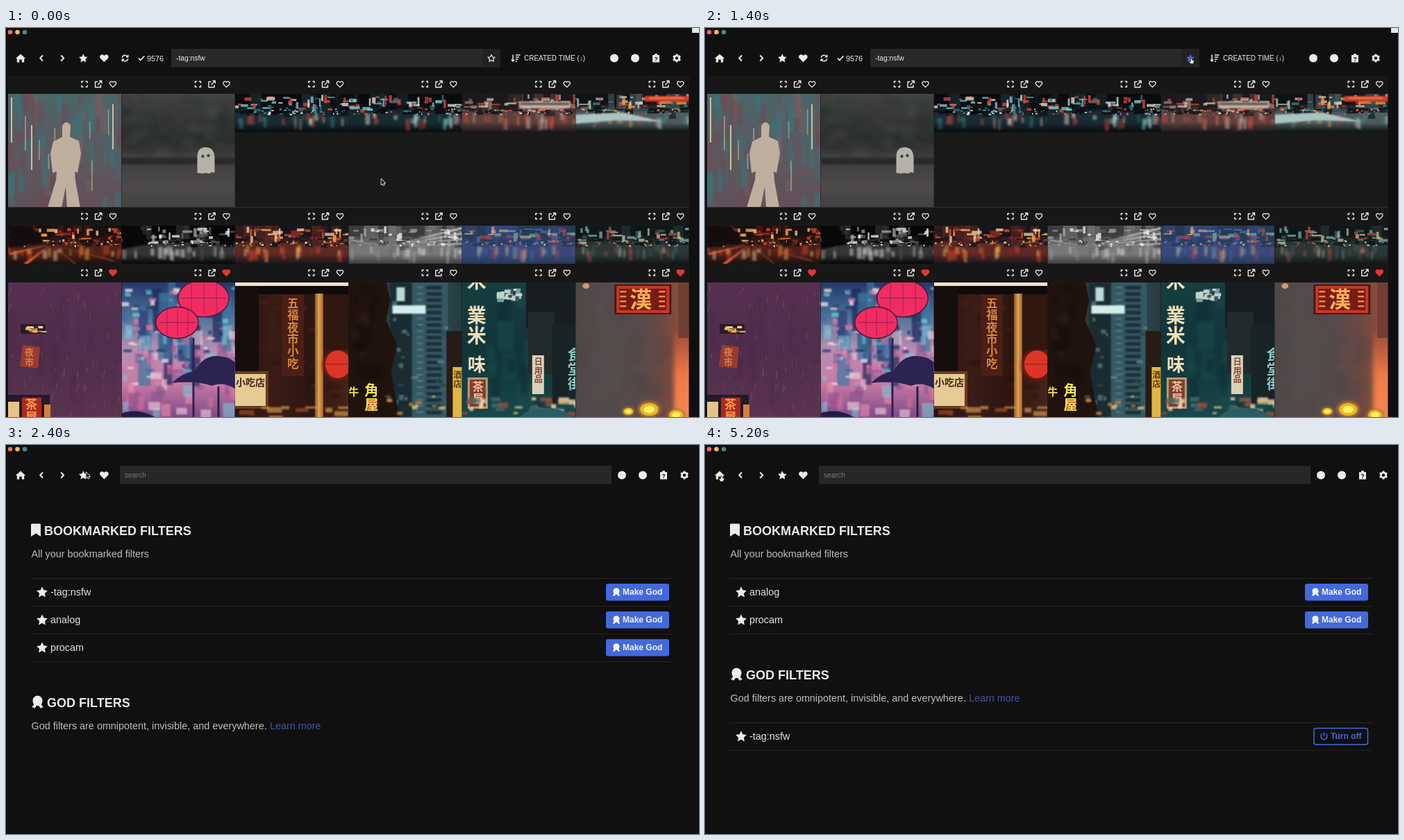
Animation, 998 px wide and 561 px high, one loop 5.3 s. Source, as an HTML page with a canvas:

```html
<!DOCTYPE html>
<html lang="en">
<head>
<meta charset="utf-8">
<title>Bookmarked filters</title>
<style>
html, body { margin: 0; width: 100%; height: 100%; overflow: hidden; background: #101010 }
canvas { display: block }
</style>
</head>
<body>
<canvas id="stage" width="998" height="561"></canvas>
<script>
const LOOP = 5300, STEP = 100, COL = 163.45, LEFT = 3;
const SANS = '"Liberation Sans", Arial, sans-serif';
const CJK = '"Noto Sans CJK JP", "Noto Sans CJK SC", "Noto Sans CJK", sans-serif';
const WHITE = '#ebebeb', BLUE = '#4469dc';

// name: [path around 0,0; stroke width, or 0 for a filled shape]
const ICONS = {
  home: ['M-7.2.4L0-6 7.2.4H5.2V6H1.8V2H-1.8V6H-5.2V.4Z', 0],
  left: ['M2-4L-2 0 2 4', 1.9],
  right: ['M-2-4L2 0-2 4', 1.9],
  star: ['M0-6.2L1.9-2.2 6.3-1.6 3.1 1.5 3.9 5.9 0 3.8-3.9 5.9-3.1 1.5-6.3-1.6-1.9-2.2Z', 0],
  heart: ['M0 5.8L-5.3.6C-8.5-3.4-3-7.6 0-3.6 3-7.6 8.5-3.4 5.3.6Z', 0],
  refresh: ['M-4.5-.8A4.6 4.6 0 0 1 4-2.2M4.6-5V-1.8H1.4M4.5.8A4.6 4.6 0 0 1-4 2.2M-4.6 5V1.8H-1.4', 1.5],
  check: ['M-4 .2L-1.3 3 4.3-3', 1.8],
  sort: ['M-4-5V4M-6.2 2L-4 4.5-1.8 2M0-4.5H6.5M0-1.5H5M0 1.5H3.5M0 4.5H2', 1.5],
  gear: ['M-3.6 0A3.6 3.6 0 1 0 3.6 0A3.6 3.6 0 1 0-3.6 0M0-6V-4M0 4V6M5.2-3L3.5-2M-5.2-3L-3.5-2M5.2 3L3.5 2M-5.2 3L-3.5 2', 2.8],
  clip: ['M-5-4.6H-2V-6.2H2V-4.6H5V6H-5Z', 0],
  dot: ['M-6 0A6 6 0 1 0 6 0A6 6 0 1 0-6 0', 0],
  expand: ['M-4-1.5V-4H-1.5M1.5-4H4V-1.5M4 1.5V4H1.5M-1.5 4H-4V1.5', 1.5],
  link: ['M-1-3.5H-4.5V4.5H3.5V1M1-4.8H4.8V-1M4.5-4.5L-1 1', 1.4],
  bookmark: ['M-6-9H6L7-8V9.5L0 5-7 9.5V-8Z', 0],
  badge: ['M-7-2A7 7 0 0 1 7-2C7 1 6 2.5 5.2 3.5L8.5 8H5.8L4.6 9.6 1.4 5.4H-1.4L-4.6 9.6-5.8 8H-8.5L-5.2 3.5C-6 2.5-7 1-7-2Z', 0],
  power: ['M-2.8-3.6A4.6 4.6 0 1 0 2.8-3.6M0-5.5V-.5', 1.5],
  arrow: ['M0 0V9L2.1 7.2 3.5 10.2 4.9 9.6 3.6 6.6H6.3Z', 0],
  hand: ['M-.9.6Q0-.6.9.6V3L4.2 3.8V6.4L3 9H-1.6L-3.6 5.8-2.6 4.8-.9 6Z', 0]
};
for (const icon of Object.values(ICONS)) icon[0] = new Path2D(icon[0]);

const stage = document.getElementById('stage').getContext('2d');
let g = stage;

function rect(color, x, y, w, h) { g.fillStyle = color; g.fillRect(x, y, w, h); }
function oval(color, x, y, rx, ry = rx) {
  g.fillStyle = color;
  g.beginPath();
  g.ellipse(x, y, rx, ry, 0, 0, 7);
  g.fill();
}
function shape(color, d) { g.fillStyle = color; g.fill(new Path2D(d)); }
function text(str, x, y, size, color = WHITE, weight = '', family = SANS) {
  g.font = `${weight} ${size}px ${family}`;
  g.fillStyle = color;
  g.fillText(str, x, y);
}
function column(str, x, y, size, color) {
  [...str].forEach((ch, i) => text(ch, x, y + i * size * 1.05, size, color, 'bold', CJK));
}
function fade(x, y, w, h, colors, across = false) {
  const grad = g.createLinearGradient(x, y, across ? x + w : x, across ? y : y + h);
  colors.forEach((c, i) => grad.addColorStop(i / (colors.length - 1), c));
  rect(grad, x, y, w, h);
}
function soft(radius, draw) {
  g.filter = `blur(${radius}px)`;
  draw();
  g.filter = 'none';
}
function icon(name, x, y, color = WHITE, scale = 1, line) {
  const [path, width] = ICONS[name];
  g.save();
  g.translate(x, y);
  g.scale(scale, scale);
  g.fillStyle = g.strokeStyle = color;
  g.lineWidth = line || width;
  g.lineJoin = 'round';
  if (width || line) g.stroke(path); else g.fill(path);
  g.restore();
}

let seed = 1;
function random(a = 0, b = 1) {
  seed = (seed * 1664525 + 1013904223) % 4294967296;
  return a + (b - a) * seed / 4294967296;
}
function scatter(n, [x, y, w, h], [w0, w1, h0, h1], colors, alpha = 1) {
  g.globalAlpha = alpha;
  while (n--) {
    const color = colors[Math.floor(random(0, colors.length))];
    rect(color, x + random(0, w), y + random(0, h), random(w0, w1), random(h0, h1));
  }
  g.globalAlpha = 1;
}

// Each picture is clipped to its tile and drawn in the tile's own coordinates.
function tile(col, y, h, draw) {
  g.save();
  g.translate(LEFT + col * COL, y);
  g.beginPath();
  g.rect(0, 0, COL - .4, h);
  g.clip();
  draw();
  g.restore();
}
function street(col, y, sky, ground, lights, extra) {
  tile(col, y, 55, () => {
    seed = col * 97 + y;
    fade(0, 0, COL, 55, [sky, sky, ground, ground, sky]);
    scatter(12, [-10, -14, COL, 16], [8, 22, 18, 36], [sky, ground], .6);
    soft(.6, () => {
      scatter(34, [-4, 3, COL, 20], [4, 15, 1.5, 5], lights, .75);
      scatter(14, [0, 0, COL, 16], [2, 5, 5, 13], lights, .75);
      scatter(20, [-4, 18, COL, 9], [6, 16, 2, 5], [sky], .8);
      scatter(36, [0, 21, COL, 8], [1, 4, 1, 2.5], lights);
    });
    soft(1.6, () => scatter(24, [0, 28, COL, 9], [2, 7, 6, 18], lights, .45));
    if (extra) soft(.8, extra);
  });
}
function rays(color, x, y, ends) {
  for (const [ex, ey] of ends) shape(color, `M${x} ${y}L${ex} ${ey}l4 2Z`);
}

function paintFigure() {
  seed = 5;
  fade(0, 0, COL, 164, ['#4c6568', '#5d5960', '#635058']);
  soft(1.5, () => scatter(90, [-4, -30, COL, 190], [3, 11, 14, 50], ['#36787c', '#754650', '#4a6669', '#7b6064'], .5));
  soft(.6, () => {
    scatter(9, [0, 0, COL, 110], [1, 2, 20, 50], ['#c4b596'], .6);
    for (const [x, y] of [[4, 5], [33, 45], [150, 15]]) rect('#cbbfa0', x, y, 2, 65);
  });
  shape('#bfaf9f', 'M78 46Q84 36 90 46L89 62 102 68 105 86 100 114 96 112 97 126 104 164H85L83 134 77 164H57L69 124 70 112 64 114 61 86 65 69 78 62Z');
}
function paintForest() {
  seed = 8;
  fade(0, 0, COL, 164, ['#454746', '#373938', '#2d2f2f', '#494747', '#464443', '#3f3d3d']);
  soft(4, () => scatter(110, [-8, -6, COL, 92], [6, 20, 5, 13], ['#303332', '#3e4140', '#292c2b', '#4c4f4d'], .4));
  soft(1.5, () => rect('#292a2a', -5, 92, COL + 10, 10));
  fade(0, 103, COL, 61, ['#413f3f', '#4d4a4a', '#424040']);
  shape('#b5b2aa', 'M109 114V91Q109 77 121 77T134 91V114L130 113 126 115 121 114 116 115Z');
  oval('#44423f', 117, 90, 2.2);
  oval('#44423f', 125, 89, 2.2);
}
function paintRain() {
  seed = 11;
  fade(0, 0, COL, 194, ['#563050', '#502d4c', '#59344f']);
  soft(2, () => scatter(24, [0, 0, COL, 190], [2, 7, 40, 100], ['#62395a', '#472643'], .3));
  scatter(70, [0, 0, COL, 194], [.6, 1.1, 4, 13], ['#a3837f', '#8a5f7c'], .4);
  rect('#2d1a29', 18, 60, 36, 14);
  scatter(12, [19, 62, 28, 8], [4, 9, 2, 4], ['#e4b454', '#a26831', '#f1db99']);
  shape('#983a31', 'M21 90L46 93 43 124 17 121Z');
  column('夜市', 24, 105, 13, '#d98148');
  rect('#251a27', 0, 162, 60, 34);
  rect('#e5c489', 0, 172, 16, 24);
  rect('#a82b22', 20, 166, 28, 30);
  column('茶屋', 25, 182, 17, '#f7a046');
  rect('#d6803a', 52, 176, 9, 20);
}
function paintLanterns() {
  seed = 14;
  fade(0, 0, COL, 194, ['#24386a', '#4a7298', '#b98fb5', '#c77aa4', '#7d4a86']);
  soft(.8, () => {
    scatter(14, [-8, -20, COL, 100], [10, 20, 50, 110], ['#1d2757', '#3b78a0', '#2a3a75'], .7);
    scatter(120, [0, 0, COL, 145], [3, 13, 2, 7], ['#6fc9d8', '#f3e9ee', '#e8749f', '#3c64a5', '#26346b'], .75);
    scatter(60, [0, 60, COL, 125], [5, 18, 6, 22], ['#f08db3', '#d86f9f', '#f4d3df', '#8d5390', '#7fc3d6'], .6);
  });
  rect('#2c2350', 102, 80, 3, 114);
  for (const [x, y, rx, ry] of [[118, 23, 36, 26], [80, 58, 30, 22]]) {
    oval('#4a1836', x, y, rx + 1.5, ry + 1.5);
    oval('#f02c63', x, y, rx, ry);
    rect('#a01f50', x - rx + 4, y - 1, rx * 2 - 8, 1.2);
    for (let i = -1; i < 2; i++) rect('#b32254', x + i * rx / 2, y - ry * .85, 1.2, ry * 1.7);
  }
  shape('#2b2351', 'M72 145Q88 130 105 128 118 105 138 106 156 107 164 116V154Q148 142 130 149 108 141 72 145Z');
  shape('#211c42', 'M0 194V189Q22 180 48 194Z');
  rect('#272046', 138, 150, 3, 44);
}
function paintAlley() {
  seed = 17;
  fade(0, 0, COL, 194, ['#24130f', '#3a1c15', '#2c1511', '#492319'], true);
  soft(2, () => scatter(30, [0, 8, COL, 185], [8, 32, 2, 6], ['#512519', '#1a0d0b', '#633120'], .45));
  rect('#eee4ca', 0, 0, COL, 5);
  rect('#0f0b0b', 0, 5, COL, 12);
  rect('#160e0c', 0, 5, 34, 125);
  rect('#4a1f16', 67, 17, 32, 118);
  soft(.5, () => column('五福夜市小吃', 75, 36, 16.5, '#d8863b'));
  fade(115, 16, 12, 178, ['#8b5526', '#dda64e', '#a75e2c'], true);
  rect('#30170f', 127, 17, 37, 80);
  soft(2, () => oval('#7a1c16', 147, 119, 21));
  oval('#dc3528', 148, 118, 18, 20);
  rect('#a5261f', 131, 117, 33, 1.5);
  rect('#6d3a1f', 0, 128, 48, 54);
  rect('#e5cc96', 0, 132, 44, 46);
  text('小吃店', 1, 149, 14, '#4a2519', 'bold', CJK);
  soft(1, () => scatter(14, [0, 178, COL, 14], [5, 22, 3, 8], ['#a14c28', '#21120f', '#d0954d'], .7));
}
function paintTower() {
  seed = 20;
  fade(0, 0, COL, 194, ['#1c1512', '#29393c', '#34515a', '#263a40'], true);
  rect('#355863', 91, 0, 52, 194);
  soft(.8, () => {
    for (let y = 5; y < 190; y += 9) {
      rect('#1b3038', 112, y, 22, 5);
      rect('#59808a', 98, y + 1, 9, 2);
    }
    rect('#1a2b31', 60, 0, 31, 194);
    scatter(35, [61, 2, 90, 180], [3, 10, 2, 7], ['#75a6ad', '#22363d', '#436a73'], .5);
    rect('#d2eeec', 63, 33, 48, 12);
    rect('#b7dadb', 69, 7, 12, 20);
  });
  shape('#20130e', 'M0 0H54L60 25 54 55 70 90 61 130 73 194H0Z');
  soft(2, () => scatter(22, [0, 0, 45, 150], [5, 18, 6, 18], ['#301d14', '#160e0b'], .55));
  rect('#281b17', 141, 70, 22, 124);
  rect('#e1b647', 150, 122, 14, 72);
  column('酒店', 151, 138, 12, '#593914');
  rect('#b32e25', 27, 168, 14, 17);
  column('牛', 0, 163, 15, '#f4dc46');
  column('角屋', 23, 163, 20, '#f5e54d');
  soft(1, () => scatter(14, [48, 160, 90, 32], [3, 10, 2, 6], ['#c98537', '#e4c880', '#406b6f'], .8));
}
function paintSigns() {
  seed = 23;
  fade(0, 0, COL, 194, ['#163e41', '#123438', '#17484a']);
  soft(2, () => scatter(22, [0, 0, COL, 180], [8, 26, 16, 45], ['#1a4c4d', '#102c30'], .55));
  rect('#171d20', 92, 0, 72, 66);
  rect('#212a2c', 95, 42, 38, 90);
  rect('#182326', 130, 60, 34, 114);
  soft(.7, () => scatter(24, [48, 8, 36, 14], [4, 11, 3, 9], ['#bfd0c9', '#7b9b9d', '#3a5559']));
  text('米', 7, 8, 28, '#ece1ba', 'bold', CJK);
  column('業米', 7, 58, 28, '#ece1ba');
  text('味', 8, 128, 26, '#ece1ba', 'bold', CJK);
  rect('#b99b76', 8, 137, 29, 45);
  rect('#823d34', 11, 140, 23, 39);
  column('茶屋', 15, 156, 16, '#efc59b');
  rect('#d9d2b8', 101, 105, 17, 56);
  column('日用品', 104, 119, 12, '#8f4337');
  column('食堂街', 152, 112, 20, '#8ccac2');
  soft(1, () => scatter(30, [0, 165, COL, 24], [4, 16, 3, 8], ['#e2bd81', '#a14d3a', '#456c69', '#f0dcaf'], .8));
  shape('#285d64', 'M84 194Q95 181 120 181T158 194Z');
}
function paintWall() {
  seed = 26;
  fade(0, 0, COL, 194, ['#4e4848', '#544b4c', '#554a4b', '#6a4843', '#96503a'], true);
  soft(3, () => {
    scatter(30, [0, 0, 130, 190], [10, 35, 8, 30], ['#5a5050', '#4a4344'], .25);
    fade(142, 70, 30, 130, ['#9c4b35', '#f07a48', '#f58a50']);
  });
  rect('#713e35', 148, 0, 16, 80);
  rect('#4a1713', 56, 3, 82, 43);
  rect('#c73825', 59, 5, 76, 39);
  rect('#791b16', 63, 9, 68, 31);
  text('漢', 78, 36, 32, '#ffb052', 'bold', CJK);
  for (const x of [64, 120]) for (let y = 12; y < 38; y += 7) rect('#f08a3d', x, y, 9, 2.5);
  oval('#d8995d', 15, 5, 5, 4);
  for (const [x, y, r] of [[106, 183, 13], [76, 186, 7], [145, 191, 10]]) {
    soft(2, () => oval('#b17a31', x, y, r * 1.25, r * .9));
    oval('#eab825', x, y, r, r * .7);
    oval('#fff064', x, y, r * .6, r * .4);
  }
}

function paintStreets() {
  const neon = ['#e0463c', '#7fd3d8', '#efe6d6', '#357680'];
  const warm = ['#ffb14a', '#e54a2b', '#f7d69a', '#8e2d22'];
  const grey = ['#f6f6f6', '#a5a5a5', '#5b5b5b'];
  street(2, 95, '#080c10', '#1a2c33', neon);
  street(3, 95, '#080c0f', '#192b32', neon);
  street(4, 95, '#1c1a1d', '#5e3f3b', ['#cc4a3f', '#d3c4b6', '#a07f70'], () => {
    rect('#bfb0a4', 82, 11, 74, 10);
    rect('#5a4a46', 84, 13, 70, 3);
  });
  street(5, 95, '#0f1316', '#4d5b5c', ['#dd3429', '#c9cfc4', '#e1a04c', '#47868e'], () => {
    shape('#a9c4c3', 'M0 30L70 27 125 40 60 38 0 43Z');
    rect('#d8382b', 100, 3, 64, 8);
    rect('#e9924a', 106, 5, 50, 2);
  });
  street(0, 285, '#1a1010', '#4a2119', warm, () => {
    shape('#150d0d', 'M0 0H34L52 26 0 32Z');
    rays('#e2673a', 62, 27, [[0, 40], [22, 55], [96, 55], [150, 50]]);
  });
  street(1, 285, '#070707', '#343434', grey, () => shape('#080808', 'M0 0H28L38 27 0 34Z'));
  street(2, 285, '#16151f', '#5c2a24', warm);
  street(3, 285, '#3c3c3c', '#777777', grey, () =>
    rays('#d8d8d8', 62, 29, [[164, 2], [164, 10], [164, 18], [164, 25], [0, 20]]));
  street(4, 285, '#243c55', '#38487f', ['#73a8a7', '#c7a578', '#9b4758', '#5066a3']);
  street(5, 285, '#101819', '#2b3736', ['#b64b42', '#79aaa0', '#cbbfa1', '#3f5954']);
}

function paintGallery() {
  rect('#171717', LEFT, 69, 981, 492);
  rect('#191919', LEFT + 2 * COL, 95, 4 * COL, 163);
  rect('#303030', LEFT, 258, 981, 1);
  tile(0, 95, 163, paintFigure);
  tile(1, 95, 163, paintForest);
  paintStreets();
  [paintRain, paintLanterns, paintAlley, paintTower, paintSigns, paintWall]
    .forEach((paint, col) => tile(col, 367, 194, paint));
  for (const y of [81, 271.5, 353]) for (let col = 0; col < 6; col++) {
    const x = LEFT + col * COL;
    icon('expand', x + 110, y);
    icon('link', x + 130, y);
    if (y > 300 && [0, 1, 5].includes(col)) icon('heart', x + 151, y, '#e6352f', .95);
    else icon('heart', x + 151, y, WHITE, .75, 1.7);
  }
}

function toolbar(right) {
  oval('#ec6a5e', 6, 6, 3.3);
  oval('#f0b95a', 16.5, 6, 3.3);
  oval('#4f8586', 27, 6, 3.3);
  ['home', 'left', 'right', 'star', 'heart'].forEach((name, i) => icon(name, 21 + i * 30.1, 43.5));
  ['dot', 'dot', 'clip', 'gear'].forEach((name, i) => icon(name, right + i * 30, 43.5));
  text('?', right + 57.6, 48, 8.5, '#101010', 'bold');
}
function galleryPage(saved) {
  g.drawImage(gallery, 0, 0);
  toolbar(876);
  rect('#e6e6e6', 988, 0, 10, 7);
  icon('refresh', 171.5, 43.5, WHITE, .95);
  icon('check', 195, 43.5);
  text('9576', 203, 47.5, 10.8);
  rect('#282828', 238, 30, 474, 26.5);
  rect('#222222', 686, 30, 26, 26.5);
  text('-tag:nsfw', 245, 47, 10.3);
  if (saved) icon('star', 699, 43.5, BLUE, .95);
  else icon('star', 699, 43.5, WHITE, .8, 1.5);
  icon('sort', 734, 43.5);
  text('CREATED TIME (↓)', 746, 47, 10);
}

function filterList(names, top, god) {
  rect('#292929', 36, top, 925, 1);
  names.forEach((name, i) => {
    const y = top + 20 + i * 40;
    rect('#242424', 36, y + 20, 925, 1);
    icon('star', 52, y, WHITE, 1.25);
    text(name, 64, y + 5, 14.4, '#e2e2e2');
    g.beginPath();
    if (god) {
      g.roundRect(877, y - 11.5, 77.5, 23.5, 3);
      g.strokeStyle = BLUE;
      g.lineWidth = 1.5;
      g.stroke();
      icon('power', 891.5, y, BLUE);
      text('Turn off', 901, y + 4.2, 12, BLUE, 'bold');
    } else {
      g.roundRect(864, y - 12, 91, 24.5, 3);
      g.fillStyle = BLUE;
      g.fill();
      icon('badge', 879, y, '#f2f2f2', .65);
      text('Make God', 888, y + 4.2, 12, '#f2f2f2', 'bold');
    }
  });
}
function filtersPage(promoted) {
  toolbar(887);
  rect('#272727', 164, 30, 708, 26.5);
  text('search', 171, 47, 10.2, '#777777');
  icon('bookmark', 43, 122.5);
  text('BOOKMARKED FILTERS', 55, 130, 18, WHITE, 'bold');
  text('All your bookmarked filters', 36.5, 162, 14.4, '#bdbdbd');
  const names = promoted ? ['analog', 'procam'] : ['-tag:nsfw', 'analog', 'procam'];
  filterList(names, 192, false);
  const y = 251 + names.length * 40;
  icon('badge', 45.5, y - .5);
  text('GOD FILTERS', 59, y + 6.5, 18, WHITE, 'bold');
  text('God filters are omnipotent, invisible, and everywhere.', 36.5, y + 38.5, 14.4, '#bdbdbd');
  text('Learn more', 380, y + 38.5, 14.4, '#43549f');
  if (promoted) filterList(['-tag:nsfw'], 400, true);
}

// time, x, y, pointing hand from this moment on
const POINTER = [
  [0, 540.5, 218], [100, 540.5, 218], [600, 700.5, 44, 1],
  [1700, 700.5, 44], [2200, 115.5, 39.5, 1],
  [2400, 115.5, 39.5], [2700, 591, 215.5], [3000, 591, 215.5],
  [3500, 898, 210.5, 1], [4300, 898, 210.5], [5000, 23.5, 45, 1], [LOOP, 23.5, 45]
];
function pointer(t) {
  const i = POINTER.findIndex(key => key[0] > t);
  const [t0, x0, y0, hand] = POINTER[i - 1], [t1, x1, y1] = POINTER[i];
  const p = (t - t0) / (t1 - t0), e = p * p * (3 - 2 * p);
  const x = x0 + (x1 - x0) * e, y = y0 + (y1 - y0) * e;
  const name = hand ? 'hand' : 'arrow', scale = hand ? .8 : .85;
  icon(name, x, y, hand ? '#111' : '#eee', scale, hand ? 1.6 : 2);
  icon(name, x, y, hand ? '#fff' : '#111', scale);
}

const gallery = document.createElement('canvas');
gallery.width = 998;
gallery.height = 561;
g = gallery.getContext('2d');
paintGallery();
g = stage;

function frame() {
  const t = Math.floor(performance.now() % LOOP / STEP) * STEP;
  rect('#101010', 0, 0, 998, 561);
  if (t < 2400) galleryPage(t >= 700);
  else filtersPage(t >= 3700);
  pointer(t);
  requestAnimationFrame(frame);
}
frame();
</script>
</body>
</html>
```
